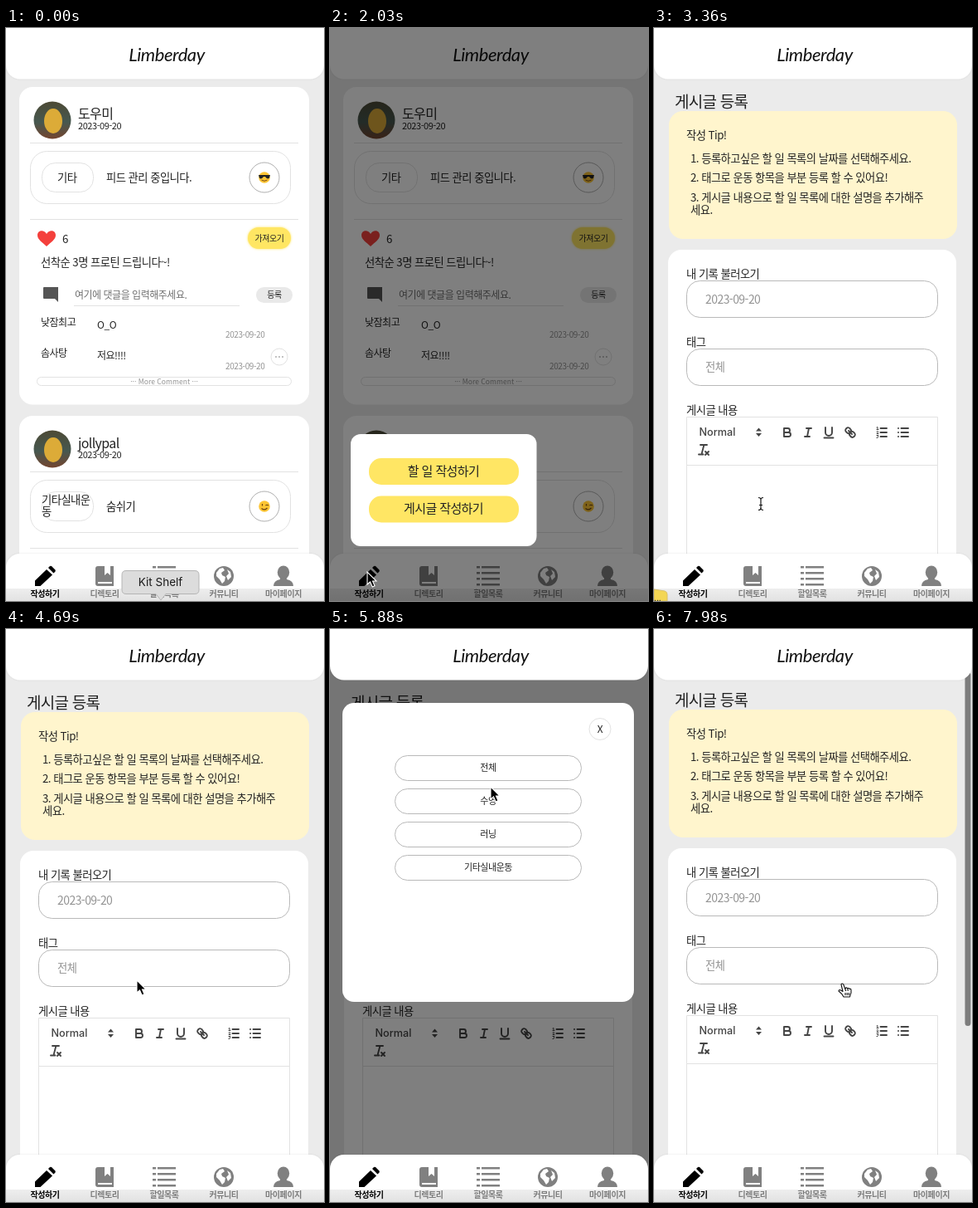
An HTML page that plays this animation: 384 by 690 pixels, repeating every 8000 ms.

```html
<!DOCTYPE html>
<html lang="ko">
<head>
<meta charset="utf-8">
<title>Workout feed</title>
<style>
html, body { margin: 0; width: 100%; height: 100%; overflow: hidden; background: #ebebeb; }
svg { display: block; }
text { font: 300 13.3px "Noto Sans CJK KR", "Noto Sans CJK", "Noto Sans", sans-serif; letter-spacing: -.04em; fill: #222; }
.mid { text-anchor: middle; }
text.s10 { font-size: 10px; }
text.s11 { font-size: 11px; }
text.s12 { font-size: 12px; }
text.s15 { font-size: 15px; }
text.s16 { font-size: 16px; }
text.s19 { font-size: 19px; }
text.gray { fill: #939393; }
text.logo { font: italic 400 22px Lato, sans-serif; letter-spacing: -.02em; fill: #111; }
text.ui { font: 400 13.5px Inter, sans-serif; letter-spacing: 0; fill: #1c1c1c; }
.nav text { font-size: 10px; font-weight: 700; fill: #7c7c7c; text-anchor: middle; }
.nav .on { fill: #000; }
.white { fill: #fff; }
.yellow { fill: #ffe664; }
.line { fill: none; stroke: #e2e2e2; }
.field { fill: #fff; stroke: #b9b9b9; }
.tools { fill: none; stroke: #444; stroke-width: 1.9; stroke-linecap: round; stroke-linejoin: round; }
.tools .fill { fill: #444; stroke: none; }

.k { animation: 8s step-end infinite; }
.feed { animation-name: feed; }
@keyframes feed { 0% { opacity: 1 } 41.125%, 100% { opacity: 0 } }
.post { animation-name: post; }
@keyframes post { 0% { opacity: 0 } 41.125%, 100% { opacity: 1 } }
.menu { animation-name: menu; }
@keyframes menu { 0% { opacity: 0 } 25.375% { opacity: 1 } 41.125%, 100% { opacity: 0 } }
.tags { animation-name: tags; }
@keyframes tags { 0% { opacity: 0 } 59.5% { opacity: 1 } 86.625%, 100% { opacity: 0 } }
.scroll { animation-name: scroll; }
@keyframes scroll { 0% { transform: none } 99.75%, 100% { transform: translateY(-3px) } }
.bar { animation-name: bar; }
@keyframes bar { 0% { opacity: 0 } 99.75%, 100% { opacity: 1 } }
.note { animation-name: note; }
@keyframes note { 0% { opacity: 0 } 41.125% { opacity: 1 } 46.375%, 100% { opacity: 0 } }

.tip1 { animation-name: tip1; }
@keyframes tip1 { 0% { opacity: 1 } 3.5%, 100% { opacity: 0 } }
.tip2 { animation-name: tip2; }
@keyframes tip2 { 0% { opacity: 0 } 3.5% { opacity: 1 } 5.25%, 100% { opacity: 0 } }
.tip3 { animation-name: tip3; }
@keyframes tip3 {
  0% { opacity: 0 } 5.25% { opacity: 1 }
  7.875% { opacity: 1; animation-timing-function: linear }
  14.875%, 100% { opacity: 0 }
}

.hover1 { animation-name: hover1; }
@keyframes hover1 { 0% { opacity: 0 } 81.375% { opacity: 1 } 86.625%, 100% { opacity: 0 } }
.hover2 { animation-name: hover2; }
@keyframes hover2 {
  0% { opacity: 0 } 70.5% { opacity: 1 } 72.625% { opacity: 0 }
  78.75% { opacity: 1 } 81.375%, 100% { opacity: 0 }
}
.hover3 { animation-name: hover3; }
@keyframes hover3 { 0% { opacity: 0 } 68.5% { opacity: 1 } 70.3%, 100% { opacity: 0 } }
.hover4 { animation-name: hover4; }
@keyframes hover4 { 0% { opacity: 0 } 66.5% { opacity: 1 } 68.4%, 100% { opacity: 0 } }

.cursor { animation: move 8s linear infinite; }
@keyframes move {
  0%, 18.375% { transform: translate(49px, 661px) }
  21%, 28% { transform: translate(45px, 655px) }
  33.25% { transform: translate(150px, 575px) }
  35% { transform: translate(140px, 564px) }
  36.75%, 45.5% { transform: translate(129px, 573px) }
  51.625%, 52.5% { transform: translate(160px, 446px) }
  55.125%, 61.25% { transform: translate(158px, 423px) }
  71.75% { transform: translate(196px, 196px) }
  72.625%, 77.875% { transform: translate(194px, 190px) }
  79.625%, 80.5% { transform: translate(196px, 196px) }
  82.25%, 89.25% { transform: translate(196px, 178px) }
  96.25%, 100% { transform: translate(228px, 427px) }
}
.arrow { animation-name: arrow; }
@keyframes arrow {
  0% { opacity: 0 } 19.25% { opacity: 1 } 41.125% { opacity: 0 }
  53.375% { opacity: 1 } 86.625%, 100% { opacity: 0 }
}
.beam { animation-name: beam; }
@keyframes beam {
  0% { opacity: 0 } 41.125% { opacity: 1 } 53.375% { opacity: 0 }
  86.625% { opacity: 1 } 94.5%, 100% { opacity: 0 }
}
.hand { animation-name: hand; }
@keyframes hand { 0% { opacity: 0 } 94.5%, 100% { opacity: 1 } }
</style>
</head>
<body>
<svg width="384" height="690" viewBox="0 0 384 690">
  <defs>
    <linearGradient id="photo" x2="0" y2="1">
      <stop offset="0" stop-color="#4d4a35"/><stop offset=".55" stop-color="#465850"/><stop offset="1" stop-color="#74452f"/>
    </linearGradient>
    <linearGradient id="dock" x2="0" y2="1">
      <stop offset="0" stop-color="#eee"/><stop offset="1" stop-color="#e2e2e2"/>
    </linearGradient>
    <filter id="soft" x="-20%" y="-40%" width="140%" height="180%">
      <feDropShadow dx="0" dy="0" stdDeviation="1" flood-color="#000" flood-opacity=".1"/>
    </filter>
    <filter id="glow" x="-20%" y="-40%" width="140%" height="180%">
      <feDropShadow dx="0" dy="0" stdDeviation="1.5" flood-color="#ffe040" flood-opacity=".8"/>
    </filter>
    <!-- upper part shared by both feed cards -->
    <g id="cardTop">
      <circle cx="56" cy="111" r="22.5" fill="url(#photo)"/>
      <ellipse cx="57" cy="112" rx="11" ry="15" fill="#dcab38"/>
      <path class="line" d="M29 138.5H353M29 230.5H353"/>
      <rect class="line" x="29.5" y="148.5" width="314" height="63" rx="20"/>
      <rect class="line" x="43.5" y="162.5" width="62" height="35" rx="16"/>
      <circle cx="312" cy="180" r="18" fill="#fff" stroke="#b0b0b0"/>
      <circle cx="312" cy="180" r="6.8" fill="#fdc534"/>
      <text class="s11" x="87" y="122">2023-09-20</text>
    </g>
    <g id="hover">
      <rect x="81" y="155" width="226" height="31" rx="15" fill="#ddd"/>
      <rect x="78.5" y="152.5" width="225" height="30" rx="15" fill="#fff0a8" stroke="#b9b9b9"/>
    </g>
    <rect id="option" class="field" x="78.5" y="152.5" width="225" height="30" rx="15"/>
    <path id="ibeam" d="M-3-7.5Q0-7.5 0-5V5Q0 7.5-3 7.5M3-7.5Q0-7.5 0-5M3 7.5Q0 7.5 0 5M-2 1.5H2"/>
  </defs>

  <rect width="384" height="690" fill="#ebebeb"/>

  <g class="k feed">
    <rect class="white" x="16" y="71" width="350" height="382.5" rx="16"/>
    <use href="#cardTop"/>
    <text class="s16" x="87" y="109">도우미</text>
    <text x="62" y="184.5">기타</text>
    <text x="121" y="184.5">피드 관리 중입니다.</text>
    <path d="M305 177h14l-1 3.5q-2.5 2.5-5-1.5h-2q-2.5 4-5 1.5z" fill="#222"/>
    <path d="M308.5 183q3.5 2.5 7 0" fill="none" stroke="#7a4a12"/>
    <path d="M49 263C44 258 38 255 38 249.5C38 243 46.5 242.5 49 248C51.5 242.5 60 243 60 249.5C60 255 54 258 49 263Z" fill="#f4403c"/>
    <text x="68" y="259">6</text>
    <rect class="yellow" x="292" y="240" width="52" height="26" rx="13" filter="url(#glow)"/>
    <text class="mid s10" x="318" y="256.5">가져오기</text>
    <text x="42" y="287">선착순 3명 프로틴 드립니다~!</text>
    <path d="M46 312H63V330L59 326H46Q45 326 45 325V313Q45 312 46 312Z" fill="#555"/>
    <text class="s12" x="83" y="325.5" style="fill:#707070">여기에 댓글을 입력해주세요.</text>
    <path class="line" d="M82 334.5H282"/>
    <rect x="302" y="312" width="44" height="19" rx="9.5" fill="#e9e9e9"/>
    <text class="mid s10" x="324" y="325">등록</text>
    <text class="s12" x="42" y="359">낮잠최고</text>
    <text class="s12" x="110" y="362">O_O</text>
    <text class="s12" x="42" y="396">솜사탕</text>
    <text class="s12" x="110" y="399">저요!!!!</text>
    <text class="s10 gray" x="265" y="373">2023-09-20</text>
    <text class="s10 gray" x="265" y="410.5">2023-09-20</text>
    <circle class="line" cx="330" cy="396" r="10"/>
    <g fill="#777"><circle cx="326" cy="396" r=".8"/><circle cx="330" cy="396" r=".8"/><circle cx="334" cy="396" r=".8"/></g>
    <rect class="line" x="37.5" y="420.5" width="307" height="10" rx="5"/>
    <text class="mid gray" x="191" y="429" style="font-size:8.6px;letter-spacing:0">··· More Comment ···</text>

    <rect class="white" x="16" y="467" width="350" height="240" rx="16"/>
    <use href="#cardTop" y="396"/>
    <text class="s16" x="87" y="505.5">jollypal</text>
    <text x="43" y="572.5">기타실내운</text>
    <text x="43" y="587">동</text>
    <text x="121" y="580.5">숨쉬기</text>
    <path d="M309.5 573v2.5M313.5 575q1.5-1.5 3.5 0M308.5 578.5q4 3 7-.5" fill="none" stroke="#6b4212" stroke-width="1.2"/>
  </g>

  <g class="k post">
    <g class="k scroll">
      <text class="s19" x="25" y="95.5">게시글 등록</text>
      <rect x="18" y="100" width="348" height="154" rx="17" fill="#fff5cd"/>
      <text x="39" y="134">작성 Tip!</text>
      <text x="44" y="162">1. 등록하고싶은 할 일 목록의 날짜를 선택해주세요.</text>
      <text x="44" y="185">2. 태그로 운동 항목을 부분 등록 할 수 있어요!</text>
      <text x="44" y="208.5">3. 게시글 내용으로 할 일 목록에 대한 설명을 추가해주</text>
      <text x="44" y="223.5">세요.</text>

      <rect class="white" x="17" y="267" width="348" height="460" rx="16"/>
      <text x="39" y="301">내 기록 불러오기</text>
      <rect class="field" x="39.5" y="304.5" width="303" height="44" rx="16"/>
      <text class="gray" x="62" y="332" style="font-size:14px">2023-09-20</text>
      <text x="39" y="383">태그</text>
      <rect class="field" x="39.5" y="386.5" width="303" height="44" rx="16"/>
      <text class="gray" x="62" y="413">전체</text>
      <text x="39" y="465">게시글 내용</text>
      <path class="line" d="M39.5 700V468.5H342.5V700M39.5 526.5H342.5"/>
      <text class="ui" x="54.5" y="491" style="font-size:12.7px;font-weight:500;fill:#444">Normal</text>
      <g class="tools">
        <path class="fill" d="M123 485.5L126.5 481.5L130 485.5ZM123 488L126.5 492L130 488Z"/>
        <path transform="translate(152 478)" d="M5 4H9.5A2.5 2.5 0 0 1 9.5 9H5ZM5 9H10.5A2.5 2.5 0 0 1 10.5 14H5Z"/>
        <path transform="translate(177 478)" d="M7 4H13M5 14H11M8 14L10 4"/>
        <path transform="translate(202 478)" d="M5 3V9A4 4 0 0 0 13 9V3M3.5 15.5H14.5"/>
        <path transform="translate(228 478)" d="M7 7L11 11M8.9 4.577a3.476 3.476 0 0 1 .36 4.679A3.476 3.476 0 0 1 4.577 8.9C3.185 7.5 2.035 6.4 4.217 4.217S7.5 3.185 8.9 4.577ZM13.423 9.1a3.476 3.476 0 0 0-4.679-.36a3.476 3.476 0 0 0 .36 4.679c1.392 1.392 2.5 2.542 4.679 .36S14.815 10.5 13.423 9.1Z"/>
        <g transform="translate(266 478)">
          <path d="M7.5 4H15M7.5 9H15M7.5 14H15"/>
          <path stroke-width="1" d="M3 3L4 2.5V5.5M3 5.5H5M3 8Q5 7 4.8 8.5L3 10.5H5M3 12.5H5L4 14Q5.5 14.5 4 15.5H3"/>
        </g>
        <path transform="translate(292 478)" d="M6.5 4H15M6.5 9H15M6.5 14H15M3 4h.1M3 9h.1M3 14h.1"/>
        <path transform="translate(51 499)" d="M5 3H13M9.4 3L6.8 13M3 14.5H8.5M11 11L15 15M15 11L11 15"/>
      </g>
    </g>
    <rect class="k bar" x="375.5" y="52" width="7" height="426" rx="3.5" fill="#7d7d7d"/>

    <g class="k tags">
      <rect width="384" height="690" opacity=".5"/>
      <rect class="white" x="15" y="89" width="352" height="360" rx="14"/>
      <circle class="line" cx="326" cy="120.5" r="13"/>
      <text class="mid s12" x="326" y="125">X</text>
      <use href="#option"/><use href="#option" y="40"/><use href="#option" y="80"/><use href="#option" y="120"/>
      <g class="k hover1"><use href="#hover"/></g>
      <g class="k hover2"><use href="#hover" y="40"/></g>
      <g class="k hover3"><use href="#hover" y="80"/></g>
      <g class="k hover4"><use href="#hover" y="120"/></g>
      <g class="mid">
        <text class="s11" x="191" y="171">전체</text>
        <text class="s11" x="191" y="211">수영</text>
        <text class="s11" x="191" y="251">러닝</text>
        <text class="s11" x="191" y="291">기타실내운동</text>
      </g>
    </g>
  </g>

  <rect class="white" y="-30" width="384" height="91.5" rx="17" filter="url(#soft)"/>
  <text class="logo mid" x="194" y="40">Limberday</text>

  <g class="nav">
    <rect class="white" y="633" width="384" height="90" rx="17" filter="url(#soft)"/>
    <rect y="675" width="384" height="15" fill="url(#dock)"/>
    <path d="M35 672V665.5L49 652L56 658.5L41.5 672ZM51 650L53 648Q54 647.5 55 648L59.5 652.5Q60 653.5 59.5 654.5L57.5 656.5Z"/>
    <g fill="#808080">
      <path d="M111 648H130V672H111Q108 672 108 669V651Q108 648 111 648Z"/>
      <path class="white" d="M119 648H126V659L122.5 656L119 659ZM111 667H128V669H111Z"/>
      <path d="M177 648h4v2.5h-4zM177 655h4v2.5h-4zM177 662h4v2.5h-4zM177 669h4v2.5h-4zM183 648h22v2.5h-22zM183 655h22v2.5h-22zM183 662h22v2.5h-22zM183 669h22v2.5h-22z"/>
      <circle cx="263" cy="660" r="12"/>
      <path class="white" d="M254 656L258 651L262 650L264 653L260 656L261 659L265 661L264 666L261 669L258 664L254 660ZM267 652L271 655L272 661L268 665L266 660L269 657Z"/>
      <ellipse cx="335" cy="655.5" rx="7.2" ry="8"/>
      <path d="M331 661H339V664Q347 665.5 347 672H323Q323 665.5 331 664Z"/>
    </g>
    <text class="on" x="47" y="685">작성하기</text>
    <text x="119" y="685">디렉토리</text>
    <text x="191" y="685">할일목록</text>
    <text x="263" y="685">커뮤니티</text>
    <text x="335" y="685">마이페이지</text>
  </g>

  <g class="k menu">
    <rect width="384" height="690" opacity=".5"/>
    <rect class="white" x="25" y="489" width="224.5" height="135" rx="12"/>
    <rect class="yellow" x="47" y="518" width="181" height="32" rx="15"/>
    <rect class="yellow" x="47" y="563.5" width="181" height="32" rx="15"/>
    <text class="mid s15" x="137" y="538.5">할 일 작성하기</text>
    <text class="mid s15" x="137" y="584">게시글 작성하기</text>
  </g>

  <g fill="#dcdcdc" stroke="#b4b4b4">
    <g class="k tip1">
      <path d="M145 653.5H228Q233 653.5 233 658.5V676.5Q233 681.5 228 681.5H193L187 689L181 681.5H145Q140 681.5 140 676.5V658.5Q140 653.5 145 653.5Z"/>
      <text class="ui mid" x="186.5" y="672" stroke="none">Kit Shelf</text>
    </g>
    <g class="k tip2">
      <path d="M110 653.5H174Q179 653.5 179 658.5V676.5Q179 681.5 174 681.5H148L142 689L136 681.5H110Q105 681.5 105 676.5V658.5Q105 653.5 110 653.5Z"/>
      <text class="ui mid" x="142" y="672" stroke="none">Editor</text>
    </g>
    <g class="k tip3">
      <path d="M8 653.5H90Q95 653.5 95 658.5V676.5Q95 681.5 90 681.5H55L49 689L43 681.5H8Q3 681.5 3 676.5V658.5Q3 653.5 8 653.5Z"/>
      <text class="ui mid" x="49" y="672" stroke="none">Clipboard</text>
    </g>
  </g>

  <g class="k note">
    <path d="M0 676L13 678Q16 679 16 682V690H0Z" fill="#f3d654" stroke="#d9c06a"/>
    <text class="ui" x="0" y="690" style="font-size:10px">...</text>
  </g>

  <g class="cursor">
    <path class="k arrow" d="M0 0V15L3.5 12L6.2 18L9 16.8L6.5 11H11Z" stroke="#fff" stroke-width="1.1"/>
    <g class="k beam" fill="none">
      <use href="#ibeam" stroke="#fff" stroke-width="2.6" opacity=".6"/>
      <use href="#ibeam" stroke="#111" stroke-width="1.2"/>
    </g>
    <path class="k hand" d="M-2 1Q-1-1 .8 1L3 7Q3 4.5 5 5L5.8 6.5Q7 4.5 8.2 6.5Q10 5.5 10 8V11Q9 13 8.5 16H1Q-1 12-5 9Q-5 7-2.5 8L0 9.5ZM3 7L3.8 9M5.8 6.5L6.3 9M3 11V14M5.2 11V14M7.3 11V14" fill="#fff" stroke="#111" stroke-width="1.1" stroke-linejoin="round"/>
  </g>
</svg>
</body>
</html>
```
